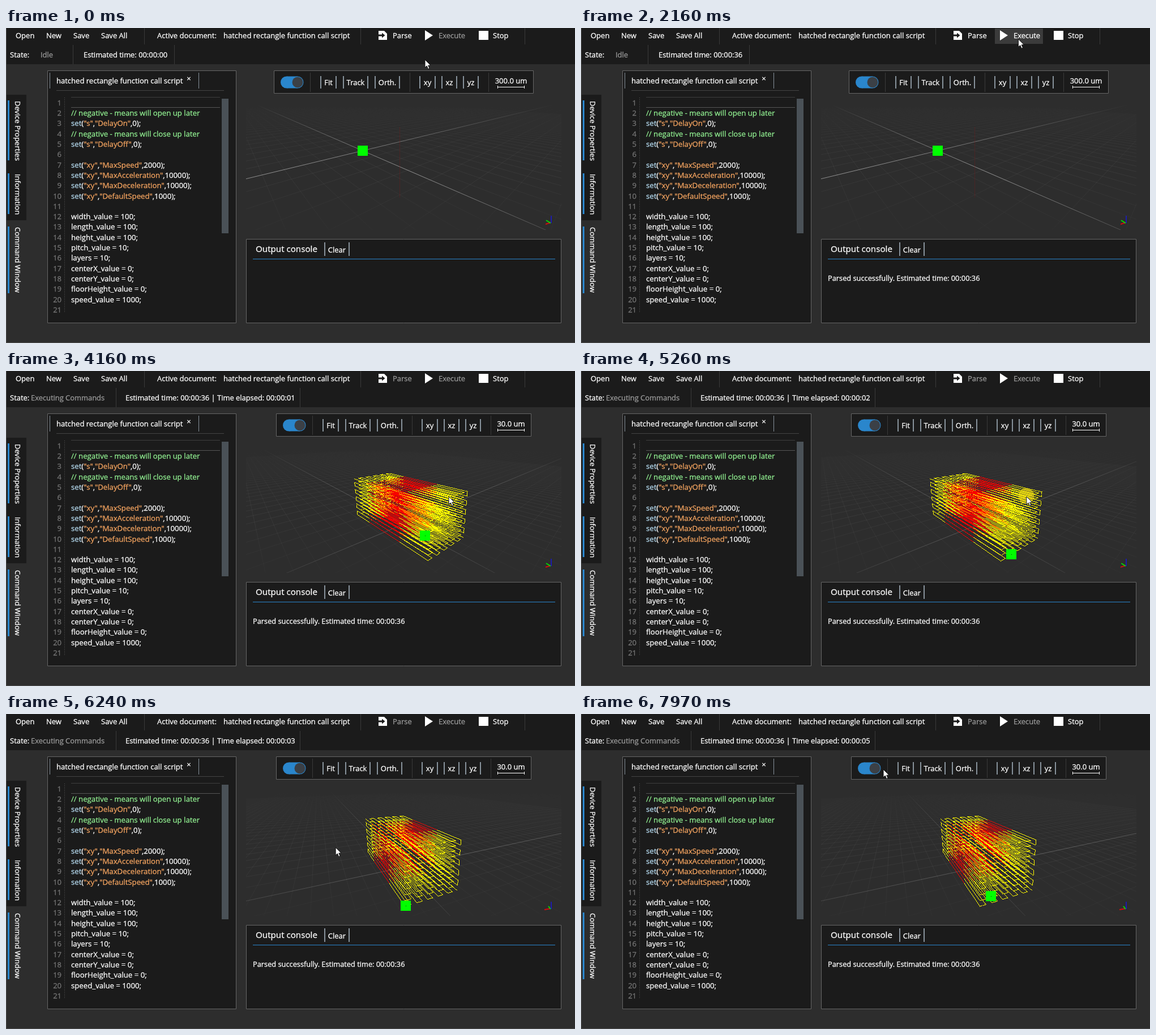
Animation of 1005 by 557 pixels, one loop 8 s. Source, as an HTML page with a canvas:

```html
<!DOCTYPE html>
<html lang="en">
<head>
<meta charset="utf-8">
<title>Script runner</title>
<style>
html, body { margin: 0; width: 100%; height: 100%; overflow: hidden; background: #2d2d2d; }
canvas { display: block; width: 100vw; height: 100vh; }
</style>
</head>
<body>
<canvas id="stage" width="1005" height="557"></canvas>
<script>
const ctx = document.getElementById('stage').getContext('2d');
const LOOP = 8000;
const FONT = '"Open Sans", "Noto Sans", sans-serif';
const BG = '#2d2d2d', PANEL = '#1b1b1b', EDGE = '#666', RULE = '#3a3a3a';
const BAR = '#87929b', BLUE = '#2a86cc', DIM = '#9a9a9a', WHITE = '#fff';
const COMMENT = '#90ee90', STRING = '#f4a460', CALL = '#b4d9ee';
const FAST = '#f80000', SLOW = '#fcf800';

const lerp = (a, b, f) => a + (b - a) * f;
const clamp = (x, lo, hi) => Math.min(hi, Math.max(lo, x));

// Rows of [time, ...values]; returns the values blended at time t.
function track(rows, t) {
  let i = 0;
  while (i < rows.length - 2 && t >= rows[i + 1][0]) i++;
  const [p, q] = [rows[i], rows[i + 1]];
  const f = clamp((t - p[0]) / (q[0] - p[0]), 0, 1);
  return p.slice(1).map((v, k) => lerp(v, q[k + 1], f));
}

function rect(x, y, w, h, color) {
  ctx.fillStyle = color;
  ctx.fillRect(x, y, w, h);
}

function frame(x, y, w, h) {
  rect(x, y, w, h, PANEL);
  ctx.strokeStyle = EDGE;
  ctx.lineWidth = 1;
  ctx.strokeRect(x + 0.5, y + 0.5, w - 1, h - 1);
}

// A hairline outline gives the letters their slightly heavy screen weight.
function text(s, x, y, color = WHITE, size = 13, align = 'left') {
  ctx.font = size + 'px ' + FONT;
  ctx.textAlign = align;
  ctx.fillStyle = ctx.strokeStyle = color;
  ctx.lineWidth = 0.3;
  ctx.lineJoin = 'round';
  ctx.fillText(s, x, y);
  ctx.strokeText(s, x, y);
  return ctx.measureText(s).width;
}

function line(x1, y1, x2, y2, color, width = 1) {
  ctx.strokeStyle = color;
  ctx.lineWidth = width;
  ctx.beginPath();
  ctx.moveTo(x1, y1);
  ctx.lineTo(x2, y2);
  ctx.stroke();
}

// One-pixel line without smoothing, in the current fill colour.
function crisp([x1, y1], [x2, y2]) {
  const n = Math.max(1, Math.round(Math.max(Math.abs(x2 - x1), Math.abs(y2 - y1))));
  for (let i = 0; i <= n; i++)
    ctx.fillRect(Math.round(lerp(x1, x2, i / n)), Math.round(lerp(y1, y2, i / n)), 1, 1);
}

function shape(points, fill, stroke) {
  ctx.beginPath();
  points.forEach(([x, y]) => ctx.lineTo(x, y));
  ctx.closePath();
  ctx.fillStyle = fill;
  ctx.fill();
  if (stroke) {
    ctx.strokeStyle = stroke;
    ctx.lineWidth = 1;
    ctx.stroke();
  }
}

function disc(x, y, r, color) {
  ctx.fillStyle = color;
  ctx.beginPath();
  ctx.arc(x, y, r, 0, 7);
  ctx.fill();
}

function button(label, left, right, y, h) {
  rect(left - 1, y, 2, h, BAR);
  rect(right - 1, y, 2, h, BAR);
  text(label, (left + right) / 2, y + h - 6, WHITE, 13, 'center');
}

// ---------- pointer ----------
const POINTER = [
  [0, 740, 56], [130, 740, 56], [400, 712, 24], [570, 700, 16], [800, 700, 16],
  [1000, 682, 62], [1240, 632, 138], [1650, 632, 138], [2150, 772, 20], [2300, 778, 15],
  [2550, 778, 15], [2800, 748, 28], [3060, 705, 48], [3280, 650, 198], [3500, 640, 212],
  [3700, 700, 216], [4100, 782, 222], [4950, 783, 222], [5260, 787, 222], [5660, 741, 223],
  [5850, 736, 224], [6200, 600, 235], [6480, 478, 241], [6600, 499, 241], [7150, 499, 241],
  [7460, 528, 180], [7720, 537, 112], [7970, 534, 98]
];
const PRESSES = [[780, 900], [2500, 2610], [4970, 5860]];

function drawPointer(t, [x, y]) {
  if (PRESSES.some(([a, b]) => t >= a && t < b)) disc(x - 0.5, y - 1, 14, 'rgba(235,215,20,.65)');
  const tip = [[0, 0], [0, 14], [3.3, 11], [5.6, 16.5], [8, 15.4], [5.7, 10.2], [10, 10]];
  shape(tip.map(([a, b]) => [x + a, y + b]), WHITE, '#111');
}

// ---------- top bars ----------
function drawTop(t, [px, py]) {
  rect(0, 0, 1005, 64, PANEL);
  [244, 626, 916].forEach(x => rect(x, 0, 1, 29, RULE));
  text('Open', 17, 18);
  text('New', 71, 18);
  text('Save', 119, 18);
  text('Save All', 168, 18);
  text('Active document:', 267, 18);
  text('hatched rectangle function call script', 384, 18, WHITE, 13.05);

  const canParse = t < 2500, canRun = t >= 1650 && t < 2500;
  if (canParse && py < 28 && px > 649 && px < 724) rect(649, 1, 75, 27, '#3b3b3b');
  if (canRun && py < 28 && px > 731 && px < 816) rect(731, 1, 85, 27, '#3b3b3b');
  shape([[658, 5], [668, 5], [673, 10], [673, 21], [658, 21]], WHITE);
  rect(658, 11.5, 7, 3, PANEL);
  shape([[664, 8.5], [669.5, 13], [664, 17.5]], PANEL);
  text('Parse', 683, 18, canParse ? WHITE : DIM);
  shape([[740, 4], [754, 13], [740, 22]], WHITE);
  text('Execute', 764, 18, canRun ? WHITE : DIM);
  rect(835, 5, 17, 16, WHITE);
  text('Stop', 860, 18);
  drawStatus(t);
}

function drawStatus(t) {
  const split = x => rect(x, 30, 1, 34, RULE);
  const status = (s, x, info, infoX, rules) => {
    text(s, x, 52, DIM, 12.9);
    text(info, infoX, 52, WHITE, 12.9);
    rules.forEach(split);
  };
  text('State:', 7, 52);
  if (t < 800) status('Idle', 61, 'Estimated time: 00:00:00', 137, [118, 297]);
  else if (t < 1650) {
    status('Rendering Commands', 44,
      'Now parsing file: hatched rectangle function call script, line 24', 214, [197, 603, 842]);
    rect(638, 35, 116, 24, '#bcbcbc');
    rect(639, 36, 114, 22, '#e6e6e6');
    rect(639, 36, 15, 22, '#06b025');
    button('Cancel', 771, 824, 36, 22);
  } else if (t < 2500) status('Idle', 61, 'Estimated time: 00:00:36', 137, [118, 297]);
  else {
    const sec = Math.max(0, Math.floor((t - 2400) / 1000));
    status('Executing Commands', 44,
      'Estimated time: 00:00:36 | Time elapsed: 00:00:0' + sec, 211, [194, 519]);
  }
}

// ---------- side tabs ----------
function drawTabs() {
  rect(0, 118, 36, 222, PANEL);
  [['Device Properties', 128, 106], ['Information', 257, 72], ['Command Window', 351, 118]]
    .forEach(([label, y, h]) => {
      rect(3, y, 3, h, BLUE);
      ctx.save();
      ctx.translate(16, y + 1);
      ctx.rotate(Math.PI / 2);
      text(label, 0, 0);
      ctx.restore();
    });
}

// ---------- script editor ----------
const SCRIPT = [
  '', '// negative - means will open up later', 'set("s","DelayOn",0);',
  '// negative - means will close up later', 'set("s","DelayOff",0);', '',
  'set("xy","MaxSpeed",2000);', 'set("xy","MaxAcceleration",10000);',
  'set("xy","MaxDeceleration",10000);', 'set("xy","DefaultSpeed",1000);', '',
  'width_value = 100;', 'length_value = 100;', 'height_value = 100;', 'pitch_value = 10;',
  'layers = 10;', 'centerX_value = 0;', 'centerY_value = 0;', 'floorHeight_value = 0;',
  'speed_value = 1000;', ''
];

function tint(part) {
  if (part.startsWith('//')) return COMMENT;
  if (part[0] === '"') return STRING;
  return part === 'set' ? CALL : WHITE;
}

function drawEditor() {
  frame(73, 75, 334, 447);
  rect(77, 79, 1, 28, BAR);
  rect(340, 79, 1, 28, BAR);
  text('hatched rectangle function call script', 89, 98, WHITE, 13.05);
  text('×', 323, 94, WHITE, 13, 'center');
  rect(89, 110, 296, 1, '#444');
  rect(115, 122, 263, 1, '#3d3d3d');
  rect(115, 140, 263, 1, '#555');
  for (let y = 123; y < 504; y += 3) rect(103, y, 1, 1, '#5a5a5a');
  rect(381, 125, 12, 238, '#4a5157');
  SCRIPT.forEach((row, i) => {
    const y = 136.8 + 18.3 * i;
    text(i + 1, 98, y, '#757575', 13, 'right');
    let x = 115;
    for (const part of row.match(/\/\/.*|"[^"]*"|set|[^"]+?(?="|$)/g) || [])
      x += text(part, x, y, tint(part), 13.2);
  });
}

// ---------- output console ----------
function drawConsole(t) {
  frame(424, 373, 557, 149);
  text('Output console', 441, 396, WHITE, 15.2);
  button('Clear', 563, 606, 379, 24);
  rect(436, 408, 534, 1, BLUE);
  if (t >= 1000) text('Parsed successfully. Estimated time: 00:00:36', 436, 447, WHITE, 12.8);
}

// ---------- view toolbar ----------
function drawToolbar(t) {
  const near = t >= 3700, dx = near ? 4 : 0;
  frame(473 + dx, 75, 459 - 2 * dx, 41);
  ctx.save();
  ctx.translate(dx, 0);
  line(496, 96, 515, 96, BLUE, 21);
  disc(495.5, 96, 10.5, BLUE);
  disc(515, 96, 10.5, BLUE);
  disc(515, 96, 9.5, '#3b4046');
  [537, 713, 852].forEach(x => rect(x, 79, 1, 34, RULE));
  [['Fit', 556, 583], ['Track', 596, 639], ['Orth.', 652, 695],
   ['xy', 731, 758], ['xz', 770, 796], ['yz', 808, 834]]
    .forEach(([s, a, b]) => button(s, a, b, 85, 22));
  ctx.restore();
  text(near ? '30.0 um' : '300.0 um', 892, 98, WHITE, 13, 'center');
  rect(868, 104, 48, 1, WHITE);
  rect(868, 102, 1, 5, WHITE);
  rect(915, 102, 1, 5, WHITE);
}

// ---------- 3D view ----------
const HORIZON = 113, MID = 702;
// time, vanishing point x, origin x, origin y, depth steps a and b, zoom
const VIEWS = [
  [0, 390, 630, 217, 0.207, 0.081, 0.09], [3350, 390, 630, 217, 0.207, 0.081, 0.09],
  [4050, 406, 702, 271, 0.207, 0.081, 1], [5200, 406, 702, 271, 0.207, 0.081, 1],
  [5660, 509, 702, 273, 0.229, 0.066, 1], [5850, 550, 702, 271, 0.253, 0.05, 1]
];

function camera(t) {
  const [v1, ox, oy, a, b, zoom] = track(VIEWS, t);
  const v2 = MID + 112000 / (MID - v1);
  const at = (u, v, z = 0, s = zoom) => {
    const p = a * u * s, q = b * v * s, w = 1 + p + q;
    const x = (ox + p * v1 + q * v2) / w;
    const y = (oy + (p + q) * HORIZON) / w;
    return [x + (x - ox) * 0.07 * z, y - 71 * z * s / w];
  };
  return { at, a, b, zoom };
}

function fade(r, g, b, alpha) {
  const grad = ctx.createLinearGradient(0, 135, 0, 356);
  [[0, 0], [0.3, 0.7], [0.55, 1], [1, 0.35]]
    .forEach(([p, k]) => grad.addColorStop(p, `rgba(${r},${g},${b},${alpha * k})`));
  return grad;
}

function drawGround({ at, a, b, zoom }) {
  const far = 24;
  const along = (v, color) => {
    const u = Math.max(-far, (-0.78 - b * v) / a);
    if (u < far) line(...at(u, v, 0, 1), ...at(far, v, 0, 1), color);
  };
  const across = (u, color) => {
    const v = Math.max(-far * 2, (-0.78 - a * u) / b);
    if (v < far * 2) line(...at(u, v, 0, 1), ...at(u, far * 2, 0, 1), color);
  };
  const faint = fade(255, 255, 255, 0.05);
  for (let n = -20; n <= 40; n++) {
    if (!n) continue;
    along(n * 0.6, faint);
    across(n * 0.4, faint);
  }
  const axis = fade(255, 255, 255, lerp(0.5, 0.24, zoom));
  along(0, axis);
  across(0, axis);
  if (zoom < 0.5) line(695.5, 175, 695.5, 300, 'rgba(130,25,25,.35)');
}

// Eleven layers of eleven hatch lines, red at full speed, yellow while speeding up or
// slowing down. The part farthest from the viewer is drawn first.
function drawHatch({ at }) {
  const each = draw => {
    for (let k = 0; k <= 10; k++)
      for (let i = 10; i >= 0; i--) draw(i / 5 - 1, k / 10, i, k);
  };
  const spans = [[1, 0.5, SLOW], [0.5, -0.4, FAST], [-0.4, -1, SLOW]];
  for (const [from, to, color] of spans) {
    ctx.fillStyle = color;
    each((v, z) => crisp(at(from, v, z), at(to, v, z)));
  }
  each((v, z, i, k) => {
    const end = i % 2 ? 1 : -1;
    if (i < 10) crisp(at(end, v, z), at(end, v + 0.2, z));
    const last = k % 2 ? 10 : 0;
    if (i === last && k < 10) {
      const side = last ? -1 : 1;
      crisp(at(side, v, z), at(side, v, z + 0.1));
    }
  });
}

// Tool position: zigzag through one layer, then back through the next.
function tool(t) {
  const pass = (t - 5330) / 468, n = Math.floor(pass), f = pass - n;
  const row = m => {
    const layer = Math.floor(m / 11), j = m - layer * 11;
    return [layer % 2 ? j : 10 - j, layer / 10];
  };
  const [i0, z0] = row(Math.max(0, n + 8)), [i1, z1] = row(Math.max(0, n + 9));
  const stop = 0.65;
  const turn = clamp((f - stop) / (1 - stop), 0, 1);
  const run = lerp(-1, 1, Math.min(1, f / stop));
  return { u: n % 2 ? -run : run, v: lerp(i0, i1, turn) / 5 - 1, z: lerp(z0, z1, turn) };
}

function drawGizmo(t) {
  const f = clamp((t - 5200) / 650, 0, 1);
  line(962, 344, lerp(953, 951, f), lerp(347, 346, f), '#d01010', 2);
  line(962, 345, lerp(954, 958, f), 340, '#00e000', 2);
  line(963, 332, 963, 345, '#1818d8', 1.5);
}

function drawView(t) {
  const cam = camera(t);
  ctx.save();
  ctx.beginPath();
  ctx.rect(424, 130, 557, 227);
  ctx.clip();
  drawGround(cam);
  const running = t >= 2600;
  const pos = running ? tool(t) : { u: 0, v: 0, z: 0 };
  const [x, y] = cam.at(pos.u, pos.v, pos.z).map(Math.round);
  const spot = () => rect(x - 9, y - 9, 18, 18, '#00ff00');
  const behind = cam.zoom < 0.5 || pos.u > 0;
  if (behind) spot();
  if (running) drawHatch(cam);
  if (!behind) {
    spot();
    rect(x, y, 1, 1, '#064006');
  }
  drawGizmo(t);
  ctx.restore();
}

function draw(now) {
  const t = now % LOOP;
  const pointer = track(POINTER, t);
  rect(0, 0, 1005, 557, BG);
  drawTop(t, pointer);
  drawTabs();
  drawEditor();
  drawView(t);
  drawToolbar(t);
  drawConsole(t);
  rect(0, 0, 1, 557, '#4a4a4a');
  rect(0, 556, 1005, 1, '#4a4a4a');
  drawPointer(t, pointer);
}

const start = performance.now();
(function tick() {
  draw(performance.now() - start);
  requestAnimationFrame(tick);
})();
</script>
</body>
</html>
```
